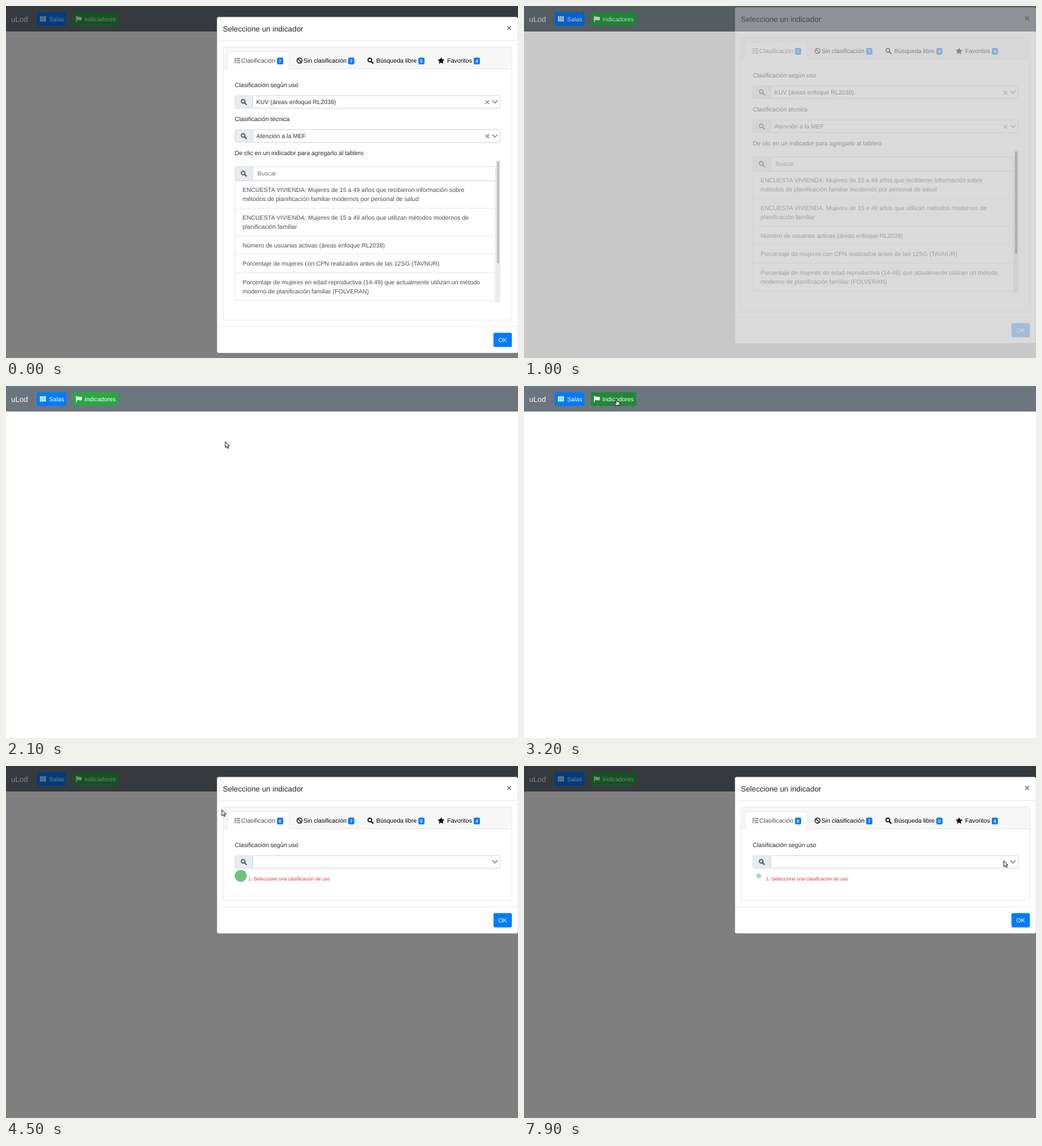
Write an HTML page that moves like this. It is 902 by 621 pixels and loops after 8000 ms.

```html
<!DOCTYPE html>
<html lang="es">
<head>
<meta charset="utf-8">
<style>
html, body { margin: 0; width: 100%; height: 100%; overflow: hidden; background: #fff; }
svg { display: block; width: 902px; height: 621px; }
text { font-family: 'Liberation Sans', Arial, sans-serif; text-rendering: geometricPrecision; white-space: pre; }
</style>
</head>
<body>
<svg id="stage" viewBox="0 0 902 621"></svg>
<script>
const LOOP = 8000, STEP = 100;
const BLUE = '#007bff', INK = '#212529', SLATE = '#495057', LINE = '#dee2e6', FIELD = '#ced4da';
const stage = document.getElementById('stage');
const clamp = v => Math.max(0, Math.min(1, v));

// Drawing helpers
const rect = (x, y, w, h, fill, extra = '') =>
  `<rect x="${x}" y="${y}" width="${w}" height="${h}" fill="${fill}" ${extra}/>`;
const box = (x, y, w, h, fill, stroke, r = 2.7) =>
  rect(x, y, w, h, fill, `stroke="${stroke}" stroke-width=".8" rx="${r}"`);
const hline = (x1, x2, y, color) => rect(x1, y - .4, x2 - x1, .8, color);
const text = (x, y, s, fill = INK, size = 10.667, extra = '') =>
  `<text x="${x}" y="${y}" fill="${fill}" font-size="${size}" ${extra}>${s}</text>`;
const path = (d, fill, extra = '') => `<path d="${d}" fill="${fill}" ${extra}/>`;
const stroke = (d, color, width, extra = '') =>
  path(d, 'none', `stroke="${color}" stroke-width="${width}" ${extra}`);
const group = (x, y, body, extra = '') => `<g transform="translate(${x} ${y})" ${extra}>${body}</g>`;

// Icons, each centred on its own origin
const icons = {
  search: c => `<circle cx="-1" cy="-1" r="3.3" fill="none" stroke="${c}" stroke-width="1.8"/>` +
    stroke('M1.5 1.5L4.6 4.6', c, 2.1, 'stroke-linecap="round"'),
  ban: c => `<circle r="4.5" fill="none" stroke="${c}" stroke-width="1.4"/>` + stroke('M-3.2-3.2L3.2 3.2', c, 1.4),
  tasks: c => stroke('M-1.2-3.5H5.2M-1.2 0H5.2M-1.2 3.5H5.2', c, 1.3) +
    stroke('M-5-3.6l1 1 1.9-2.1M-5-.1l1 1L-2.1-1.2', c, 1.1) + `<circle cx="-4" cy="3.5" r="1" fill="${c}"/>`,
  star: c => path('M' + Array.from({ length: 10 }, (_, i) => {
    const r = i % 2 ? 2.8 : 5.9, a = i * Math.PI / 5;
    return `${(r * Math.sin(a)).toFixed(2)} ${(.5 - r * Math.cos(a)).toFixed(2)}`;
  }).join('L') + 'Z', c, `stroke="${c}" stroke-width=".5" stroke-linejoin="round"`),
  flag: c => stroke('M-4.5-5V5.3', c, 1.4, 'stroke-linecap="round"') +
    path('M-4-3.6Q-2-4.8 .5-3.7T5.2-4V2Q3 3.3 .6 2.3T-4 2.6Z', c),
  grid: c => [0, 1, 2].map(i => [0, 1, 2].map(j =>
    rect(-5.3 + i * 3.7, -4.6 + j * 3.2, 3.2, 2.7, c, 'rx=".5"')).join('')).join('')
};
const icon = (name, x, y, color) => group(x, y, icons[name](color));

function navbar(t) {
  const hover = t >= 2900 && t < 4200, focus = t >= 3700 && t < 4200;
  return rect(0, 0, 902, 45, '#6c757d') +
    text(9, 27.5, 'uLod', '#fff', 13.333) +
    rect(54, 11, 52.3, 24, BLUE, 'rx="2.7"') + icon('grid', 65, 22.8, '#fff') + text(76, 26.8, 'Salas', '#fff') +
    (focus ? rect(116, 9, 83, 27.5, '#48b461', 'rx="4" opacity=".5"') : '') +
    rect(117.5, 11, 80.2, 24, hover ? '#218838' : '#28a745', 'rx="2.7"') +
    icon('flag', 128.4, 22.8, '#fff') + text(138.2, 26.8, 'Indicadores', '#fff');
}

function tab(name, ix, x, label, bx, count, color) {
  return icon(name, ix, 96.3, color) + text(x, 100, label, color) +
    rect(bx, 91, 10.9, 12, BLUE, 'rx="2.7"') +
    text(bx + 5.45, 100, count, '#fff', 8, 'font-weight="bold" text-anchor="middle"');
}

function prepend(y, h) {
  return box(403.3, y, 31.4, h, '#e9ecef', FIELD) + icon('search', 418.8, y + h / 2, SLATE);
}

function select(y, value) {
  return prepend(y, 22.3) + box(434.6, y, 436, 22.3, '#fff', '#c4c4c4') +
    stroke(`M857.4 ${y + 9}l4 4.2 4-4.2`, '#999', 2, 'stroke-linecap="round" stroke-linejoin="round"') +
    (value ? text(441, y + 15.2, value, '#333') +
      stroke(`M845.3 ${y + 8.9}l5.4 5.4m0-5.4l-5.4 5.4`, '#999', 1.8, 'stroke-linecap="round"') : '');
}

const rows = [
  ['ENCUESTA VIVIENDA: Mujeres de 15 a 49 años que recibieron información sobre',
    'métodos de planificación familiar modernos por personal de salud'],
  ['ENCUESTA VIVIENDA: Mujeres de 15 a 49 años que utilizan métodos modernos de', 'planificación familiar'],
  ['Número de usuarias activas (áreas enfoque RL2038)'],
  ['Porcentaje de mujeres con CPN realizados antes de las 12SG (TAVNUR)'],
  ['Porcentaje de mujeres en edad reproductiva (14-49) que actualmente utilizan un método',
    'moderno de planificación familiar (FOLVERAN)']
];

function indicatorList(hot) {
  let y = 308.3;
  let out = prepend(283.2, 24.8) + box(434.6, 283.2, 428, 24.8, '#fff', FIELD) +
    text(443, 299.4, 'Buscar', '#6c757d') + hline(403, 863, y, '#d5d5d5');
  for (const lines of rows) {
    lines.forEach((s, i) => out += text(416.8, y + 20 + i * 16, s, SLATE));
    y += 16.6 + lines.length * 16;
    out += hline(403, 863, y, '#dfdfdf');
  }
  return out + rect(402.9, 308, .8, 215, '#dfdfdf') + rect(862.2, 308, .8, 215, '#dfdfdf') +
    rect(863, 272, 8, 251, hot ? '#e2e2e2' : '#ececec') +
    rect(865, 274, 4, 180, hot ? '#7d7d7d' : '#c1c1c1', 'rx="1.5"');
}

function spinner(t) {
  const p = ((t - 5500) / 750 + 10 + (t < 4200 ? .165 : 0)) % 1;
  const scale = Math.min(1, p * 2), alpha = p < .5 ? p * 2 : 2 - p * 2;
  return `<circle cx="413.5" cy="193.8" r="${10.67 * scale}" fill="#28a745" opacity="${alpha}"/>`;
}

function dialog(t, filled, alpha, dy) {
  const bottom = filled ? 612.2 : 295.4;
  const body = filled
    ? select(158, 'KUV (áreas enfoque RL2038)') + text(403, 203.3, 'Clasificación técnica') +
      select(218.2, 'Atención a la MEF') +
      text(403, 263.2, 'De clic en un indicador para agregarlo al tablero') + indicatorList(t >= 700)
    : select(158) + spinner(t) +
      text(426.5, 202.4, '1.-Seleccione una clasificación de uso', '#dc3545', 8.533);
  return group(0, dy,
    rect(371.6, 19.3, 530.4, bottom - 19.3, '#fff', 'rx="3.2" stroke="#000" stroke-opacity=".2" stroke-width=".7"') +
    text(382, 45, 'Seleccione un indicador', INK, 13.333) +
    text(886.5, 43.5, '×', '#7f7f7f', 16, 'font-weight="bold" text-anchor="middle"') +
    hline(372, 902, 61, LINE) +
    box(382.4, 72, 508.7, bottom - 130.2, '#fff', '#dfdfdf') +
    rect(382.8, 72.4, 507.9, 38.2, '#f7f7f7', 'rx="2.3"') + hline(382.4, 891, 110.7, '#dfdfdf') +
    path('M389.6 111.2V83.5q0-2.7 2.7-2.7H496.3q2.7 0 2.7 2.7V111.2', '#fff', `stroke="${LINE}" stroke-width=".8"`) +
    tab('tasks', 407.6, 414.6, 'Clasificación', 477.4, filled ? 7 : 0, SLATE) +
    tab('ban', 517.2, 524, 'Sin clasificación', 602.7, 7, '#000') +
    tab('search', 642, 652.3, 'Búsqueda libre', 726.4, 0, '#000') +
    tab('star', 766.5, 777.2, 'Favoritos', 824, 4, '#000') +
    text(403, 143.3, 'Clasificación según uso') + body +
    hline(372, 902, bottom - 46.7, LINE) +
    `<g opacity="${alpha < 1 ? .65 : 1}">` + rect(858.8, bottom - 35.8, 32.4, 25.2, BLUE, 'rx="2.7"') +
    text(875, bottom - 19.3, 'OK', '#fff', 10.667, 'text-anchor="middle"') + '</g>',
    `opacity="${alpha}"`);
}

// Pointer stops: time, x, y
const stops = [
  [1300, 791, 98], [1700, 791, 98], [1900, 386, 98], [2200, 386, 98], [2400, 195, 60], [2700, 195, 60],
  [3000, 160, 23], [4300, 160, 23], [4700, 600, 131], [5600, 872, 177], [6000, 872, 177],
  [6400, 861, 171], [7000, 861, 168], [7400, 861, 168], [7700, 845, 167], [LOOP, 845, 167]
];

function pointer(t) {
  const i = stops.findIndex(s => s[0] > t);
  if (i < 1) return '';
  const [t0, x0, y0] = stops[i - 1], [t1, x1, y1] = stops[i], k = (t - t0) / (t1 - t0);
  const hand = t >= 2900 && t < 3900;
  const shape = hand
    ? 'M2.2.8Q3.2-.2 4 .8V4.4L7.8 5.3Q8.9 5.7 8.7 7L8 11H2.4L-.7 7.4Q-.4 6 1 6.7L2.2 7.6Z'
    : 'M.3.3V10.7L2.7 8.5 4.3 12.1 6.1 11.3 4.5 7.8H7.6Z';
  return group(x0 + (x1 - x0) * k, y0 + (y1 - y0) * k,
    path(shape, '#fff', 'stroke="#000" stroke-width="1" stroke-linejoin="round"'));
}

function draw(t) {
  const closing = t < 3000;
  const since = t - (closing ? 900 : 3900);
  const dim = closing ? 1 - clamp(since / 175) : clamp(since / 230);
  const alpha = closing ? 1 - clamp(since / 150) : clamp(since / 154);
  const dy = closing ? -17 * clamp(since / 100) : -50 * (1 - clamp(since / 300)) ** 2.66;
  const status = t >= 3500 && t < 4300
    ? rect(-2, 613.5, 74, 12, '#f2f2f2', 'rx="2" stroke="#bbb" stroke-width=".6"') +
      text(2, 623.3, 'pag.ejemplo:40/#', '#333', 9) : '';
  stage.innerHTML = rect(0, 0, 902, 621, '#fff') + navbar(t) +
    rect(0, 0, 902, 621, '#000', `opacity="${dim / 2}"`) +
    (alpha > 0 ? dialog(t, closing, alpha, dy) : '') + status + pointer(t);
}

const start = performance.now();
let shown = -1;
function tick() {
  const t = Math.floor((performance.now() - start) % LOOP / STEP) * STEP;
  if (t !== shown) draw(shown = t);
  requestAnimationFrame(tick);
}
tick();
</script>
</body>
</html>
```
